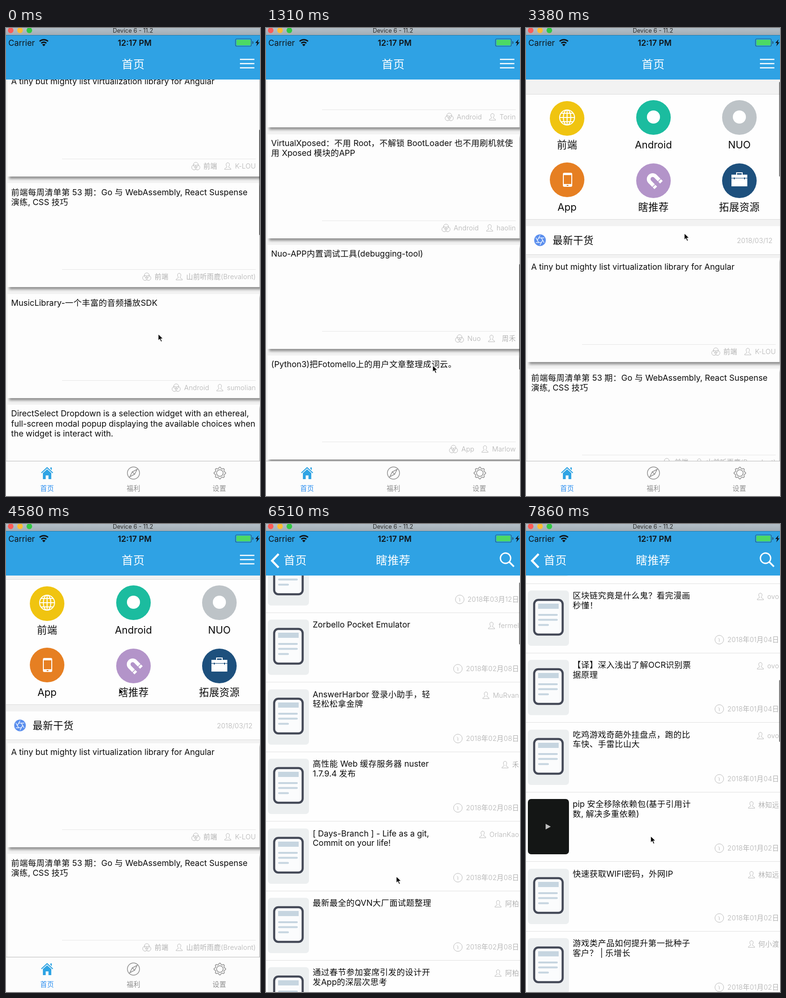
An HTML page for the animation above (8 s loop, 544 by 999 pixels).

```html
<!DOCTYPE html>
<html lang="zh-CN">
<head>
<meta charset="utf-8">
<title>首页</title>
<style>
html, body { margin: 0; width: 100%; height: 100%; overflow: hidden; background: #fff; }
#stage { position: relative; width: 544px; height: 999px; overflow: hidden; background: #f2f2f2;
  font: 17.6px Inter, "Noto Sans CJK SC", "Noto Sans CJK", sans-serif; color: #0c0c0c; white-space: nowrap; }
#stage div, #stage svg { position: absolute; }
i { font-style: normal; letter-spacing: .022em; }
svg { overflow: visible; }
.fill { inset: 0; }

#window { left: 0; top: 0; width: 544px; height: 15px; background: linear-gradient(#b3bfc8, #a3adb5);
  box-shadow: 0 1px rgba(0,0,0,.25); font-size: 12.6px; line-height: 12px; text-align: center; color: #2b2b2b; }
#top { left: 0; top: 15px; width: 544px; height: 95px; background: #2fa2e4; }
.bar { left: 0; top: 0; width: 544px; height: 95px; color: #fff; font-size: 24.2px; line-height: 30px; }
.bar .title { left: 0; width: 545px; top: 48px; text-align: center; font-weight: 500; }
.status { top: 6px; line-height: 21px; font-size: 17.4px; color: #101418; }

.view { left: 0; top: 110px; width: 544px; overflow: hidden; }
#home { left: 0; top: 0; width: 544px; height: 999px; background: #f2f2f2; }
#feed { height: 814px; }
#list { height: 889px; background: #fefefe; }
.body { left: 0; top: 0; width: 544px; }
.thumb { left: 542px; width: 3px; border-radius: 1.5px; background: rgba(0,0,0,.5); }

.panel { left: 0; width: 544px; background: #fefefe; box-shadow: 0 0 0 1px #dcdcdc; }
.disc { width: 74px; height: 74px; border-radius: 50%; }
.disc svg { left: 0; top: 0; }
.label { width: 180px; text-align: center; font-size: 21.4px; line-height: 28px; }

.card { left: 3px; width: 540px; height: 222px; background: #fdfdfd; box-shadow: 4px 5px 5px rgba(0,0,0,.4); }
.card .text { left: 8px; top: 8.3px; line-height: 21.4px; }
.card .rule { left: 117px; top: 184px; width: 415px; height: 1px; background: #e6e6e6; }
.meta { display: flex; align-items: center; height: 20px; font-size: 14.5px; line-height: 20px;
  letter-spacing: .15px; font-weight: 300; color: #b2b2b2; }
#stage .meta svg { position: static; margin-right: 7px; flex: none; }
.meta span + svg { margin-left: 15px; }
.card .meta { right: 8px; top: 190px; }

.row { left: 0; width: 544px; height: 148px; border-bottom: 1px solid #e0e0e0; }
.row .pic { left: 3.5px; top: 15px; width: 88.5px; height: 118px; border-radius: 7px; background: #eceff0; overflow: hidden; }
.row .text { left: 100px; top: 16px; line-height: 20.6px; }
.row .meta { right: 2px; }

#tabs { left: 0; top: 924px; width: 544px; height: 75px; background: #fcfcfc; border-top: 1px solid #b8b8b8; box-sizing: border-box; }
.tab { top: 49px; width: 100px; text-align: center; font-size: 14.5px; line-height: 18px; color: #8e8e8e; }
</style>
</head>
<body>
<svg width="0" height="0" style="position:absolute">
  <symbol id="cat" viewBox="0 0 19 18" overflow="visible"><g fill="none" stroke="#b8b8b8">
    <circle cx="9.5" cy="6" r="5.3"/><circle cx="6" cy="11.6" r="5.3"/><circle cx="13" cy="11.6" r="5.3"/></g></symbol>
  <symbol id="user" viewBox="0 0 16 16" overflow="visible"><path fill="none" stroke="#b8b8b8"
    d="M8 .6c-2.5 0-3.6 1.8-3.6 4 0 2 .9 3 1.6 4v1.7c-1 .9-4.4 1.2-4.9 4.5h13.8c-.5-3.3-3.9-3.6-4.9-4.5V8.6c.7-1 1.6-2 1.6-4 0-2.2-1.1-4-3.6-4z"/></symbol>
  <symbol id="clock" viewBox="0 0 20 20" overflow="visible"><g fill="none" stroke="#b8b8b8">
    <circle cx="10" cy="10" r="9.3"/><path d="M8 6.5l2 2v6"/></g></symbol>
</svg>

<div id="stage">
  <div id="home">
    <div id="feed" class="view"><div class="body"></div><div class="thumb"></div></div>
    <div id="tabs">
      <svg width="544" height="50" fill="none" stroke="#8e8e8e" stroke-width="1.5">
        <path fill="#2fa4e4" stroke="none" d="M88 12l13 12-1.5 1.6L88 15 76.500 25.600 75 24zM95 13h3v6l-3-3zM79 25l9-8 9 8v13h-6v-8h-6v8h-6z"/>
        <circle cx="273" cy="25" r="13"/>
        <path d="M281 17l-5.500 10.500-5-5zM265 33l5.500-10.500 5 5z"/>
        <circle cx="458" cy="25" r="7"/><path id="gear" stroke-linejoin="round"/>
      </svg>
      <div class="tab" style="left:38px;color:#2b8ef0"><i>首页</i></div>
      <div class="tab" style="left:223px"><i>福利</i></div>
      <div class="tab" style="left:407px"><i>设置</i></div>
    </div>
  </div>

  <div id="list" class="view"><div class="body"></div><div class="thumb"></div></div>

  <div id="top">
    <div class="bar" id="homeBar">
      <div class="title"><i>首页</i></div>
      <svg width="544" height="95" stroke="#fff" stroke-width="2.4"><path d="M501 52h31M501 61h31M501 70h31"/></svg>
    </div>
    <div class="bar" id="listBar">
      <div class="title"><i>瞎推荐</i></div>
      <div style="left:38px;top:48px"><i>首页</i></div>
      <svg width="544" height="95" fill="none" stroke="#fff">
        <path stroke-width="4.5" d="M27 49L13 63.5 27 78"/>
        <circle cx="513" cy="58" r="11" stroke-width="2.8"/><path stroke-width="3.6" d="M521 66l10 10"/>
      </svg>
    </div>
    <div class="status" style="left:5px">Carrier</div>
    <div class="status" style="left:0;width:551px;text-align:center;font-weight:600">12:17 PM</div>
    <svg width="544" height="30" fill="none" stroke="#101418">
      <path stroke-width="3" d="M72 13.5a13 13 0 0 1 18 0M75.5 17.5a8 8 0 0 1 11 0"/>
      <path fill="#101418" stroke="none" d="M77.5 20.5a5 5 0 0 1 7 0L81 24z"/>
      <rect x="491.5" y="8" width="34" height="16" rx="3" stroke="#27607f" stroke-width="1.2"/>
      <rect x="493.5" y="10" width="30" height="12" rx="1.5" fill="#4cd964" stroke="none"/>
      <path fill="#27607f" stroke="none" d="M527.5 13q2.5 0 2.5 3t-2.5 3z"/>
      <path fill="#101418" stroke="none" d="M541 9l-7 8h4l-2 7 7-8.5h-4z"/>
    </svg>
  </div>
  <div id="window">
    <svg style="left:0;top:0" width="60" height="15"><circle cx="10" cy="5" r="6" fill="#fc5b57"/>
      <circle cx="30" cy="5" r="6" fill="#fdbc30"/><circle cx="50" cy="5" r="6" fill="#30c842"/></svg>
    <div class="fill">Device 6 - 11.2</div>
  </div>
  <svg id="cursor" style="left:0;top:0" width="13" height="19"><path stroke="#fff" stroke-width="1.2"
    d="M0 0v14.5l3.4-3.2 2.4 5.7 2.6-1.1-2.4-5.5h4.7z"/></svg>
</div>

<script>
const $ = s => document.querySelector(s);
const text = s => s.replace(/[\u3000-\uffef]+/g, '<i>$&</i>').replace(/\n/g, '<br>');
const icon = (id, w, h) => `<svg width="${w}" height="${h}"><use href="#${id}"/></svg>`;
const user = name => icon('user', 16, 16) + `<span>${text(name)}</span>`;

// Outline of the settings gear
const teeth = [];
for (let k = 0; k < 32; k++) {
  const a = (k - .5) * Math.PI / 16, r = k % 4 < 2 ? 12.5 : 10;
  teeth.push([458 + r * Math.sin(a), 25 - r * Math.cos(a)]);
}
$('#gear').setAttribute('d', 'M' + teeth.join('L') + 'z');

const groups = [
  ['前端', 88, 193, '#f0c410', '<g fill="none" stroke="#fff" stroke-width="2"><circle cx="37" cy="35" r="16"/><ellipse cx="37" cy="35" rx="8" ry="16"/><path d="M37 19v32M21 35h32M24 26h26M24 44h26"/></g>'],
  ['Android', 273, 191, '#1bbc9f', '<circle cx="37" cy="36" r="14"/>'],
  ['NUO', 457, 191, '#bdc3c7', '<circle cx="37" cy="36" r="14"/>'],
  ['App', 88, 324, '#e67f22', '<path fill-rule="evenodd" d="M31 22h14q3 0 3 3v24q0 3-3 3H31q-3 0-3-3V25q0-3 3-3zM30 27v19h16V27zM36 48v2h4v-2z"/>'],
  ['瞎推荐', 273, 326, '#b394c9', '<g transform="rotate(-45 37 36)"><path fill="none" stroke="#fff" stroke-width="8" d="M29 51V33a8.5 8.5 0 0 1 17 0v18"/><path stroke="#b394c9" stroke-width="1.5" d="M24 45h10M41 45h10"/></g>'],
  ['拓展资源', 457, 326, '#1d507d', '<path d="M20 24h34v7H20zM20 32h34v17H20z"/><path fill="none" stroke="#fff" stroke-width="2" d="M31 24v-4h12v4"/><path stroke="#1d507d" stroke-width="2" d="M26 30v4M48 30v4"/>']
];

const cards = [
  ['A tiny but mighty list virtualization library for Angular', '前端', 'K-LOU'],
  ['前端每周清单第 53 期：Go 与 WebAssembly, React Suspense\n演练, CSS 技巧', '前端', '山前听雨鹿(Brevalont)'],
  ['MusicLibrary-一个丰富的音频播放SDK', 'Android', 'sumolian'],
  ['DirectSelect Dropdown is a selection widget with an ethereal,\nfull-screen modal popup displaying the available choices when\nthe widget is interact with.', 'Android', 'Kelvor'],
  ['Android 轻量级下拉刷新控件', 'Android', 'Torin'],
  ['VirtualXposed：不用 Root，不解锁 BootLoader 也不用刷机就使\n用 Xposed 模块的APP', 'Android', 'haolin'],
  ['Nuo-APP内置调试工具(debugging-tool)', 'Nuo', '\u2002周禾'],
  ['(Python3)把Fotomello上的用户文章整理成词云。', 'App', 'Marlow'],
  ['高性能 Web 缓存服务器 nuster 1.7.9.6 发布', '瞎推荐', 'null'],
  ['一个帮你轻松完成Api接口调试的IDEA插件', '拓展资源', '云端里的琴声'],
  ['Blockchain 区块链-学习资源汇总', '拓展资源', 'shuyezhi']
];

const rows = [
  ['高性能 Web 缓存服务器 nuster\n1.7.9.6 发布', '禾', '03月12'],
  ['Zorbello Pocket Emulator', 'fermel', '02月08'],
  ['AnswerHarbor 登录小助手，轻\n轻松松拿金牌', 'MuRvan', '02月08'],
  ['高性能 Web 缓存服务器 nuster\n1.7.9.4 发布', '禾', '02月08'],
  ['[ Days-Branch ] - Life as a git,\nCommit on your life!', 'OrlanKao', '02月08'],
  ['最新最全的QVN大厂面试题整理', '阿柏', '02月08'],
  ['通过春节参加宴席引发的设计开\n发App的深层次思考', '阿柏', '02月08'],
  ['100行python能做什么？能在朋\n友圈登顶。', 'Stephen Lorn', '01月16', 'shot'],
  ['轻松励志有节操的程序猿故事。', 'Meilo Tan', '01月10'],
  ['If You Had Bought Crypto', 'Ozzmind', '01月10'],
  ['区块链究竟是什么鬼？看完漫画\n秒懂！', 'ovo', '01月04'],
  ['【译】深入浅出了解OCR识别票\n据原理', 'ovo', '01月04'],
  ['吃鸡游戏奇葩外挂盘点，跑的比\n车快、手雷比山大', 'ovo', '01月04'],
  ['pip 安全移除依赖包(基于引用计\n数, 解决多重依赖)', '林知远', '01月02', 'video'],
  ['快速获取WIFI密码，外网IP', '林知远', '01月02'],
  ['游戏类产品如何提升第一批种子\n客户？ | 乐增长', '何小渡', '01月02']
];

const pics = {
  doc: '<rect x="13.5" y="20" width="61" height="74" rx="9" fill="#fbfcfd" stroke="#444957" stroke-width="4.5"/><path fill="#c6d5e0" d="M22 28h44v11H22z"/><path stroke="#c6d5e0" stroke-width="4.2" stroke-linecap="round" d="M24 52h38M24 62.5h38M24 73.5h19"/>',
  shot: '<path fill="#fafafa" d="M0 0h89v118H0z"/><path fill="#1c1e1d" d="M0 0h10v13H0zM13 0h60v18H13zM76 0h13v13H76zM0 107h10v11H0zM13 107h60v11H13zM76 107h13v11H76z"/><path fill="#a9c25c" d="M0 30h10v7H0zM17 6h5v5h-5z"/><path fill="#666" d="M14 98h58v8H14z"/><path stroke="#aaa" stroke-width="1.5" stroke-dasharray="14 32" d="M15 20h58M15 33h58M15 46h58M15 59h58M15 72h58M15 85h58"/>',
  video: '<path fill="#141615" d="M0 0h89v118H0z"/><path fill="#bdbdbd" d="M38 53l11 6-11 6z"/>'
};

const grid = groups.map(([name, x, y, color, art], k) =>
  `<div class="disc" style="left:${x - 37}px;top:${y - 170}px;background:${color}"><svg width="74" height="74" fill="#fff">${art}</svg></div>
   <div class="label" style="left:${x - 90}px;top:${k < 3 ? 102 : 235}px">${text(name)}</div>`).join('');

const blades = [0, 60, 120, 180, 240, 300].map(a => `<path transform="rotate(${a})" d="M-3 -5L9 -5"/>`).join('');

$('#feed .body').innerHTML =
  `<div class="panel" style="top:9px;height:266px"></div>${grid}
   <div class="panel" style="top:290px;height:60px;box-shadow:0 1px #dcdcdc">
     <svg style="left:30px;top:30px" width="1" height="1" stroke="#fff" stroke-width="1.3"><circle r="12.5" fill="#5b8fee" stroke="none"/>${blades}</svg>
     <div style="left:57px;top:16px;font-size:21.5px;line-height:28px"><i>最新干货</i></div>
     <div class="meta" style="right:16px;top:21px">2018/03/12</div>
   </div>` +
  cards.map(([title, kind, name], k) =>
    `<div class="card" style="top:${358 + 236.3 * k}px"><div class="text">${text(title)}</div><div class="rule"></div>
     <div class="meta">${icon('cat', 19, 18)}<span>${text(kind)}</span>${user(name)}</div></div>`).join('');

$('#list .body').innerHTML = rows.map(([title, name, day, pic = 'doc'], k) =>
  `<div class="row" style="top:${1 + 148.4 * k}px"><div class="pic"><svg width="88" height="118">${pics[pic]}</svg></div>
   <div class="text">${text(title)}</div><div class="meta" style="top:18px">${user(name)}</div>
   <div class="meta" style="top:110px">${icon('clock', 20, 20)}<span>${text(`2018年${day}日`)}</span></div></div>`).join('');

// Keys are [step, value...], joined by straight lines
function along(keys, n) {
  let k = 1;
  while (k < keys.length - 1 && keys[k][0] < n) k++;
  const a = keys[k - 1], b = keys[k];
  const p = Math.min(1, Math.max(0, (n - a[0]) / (b[0] - a[0])));
  return a.slice(1).map((v, j) => v + (b[j + 1] - v) * p);
}

const feedKeys = [[0, 373], [1, 410], [4, 850], [9, 1423], [11, 1660], [13, 2080], [15, 2172], [16, 2160],
  [17, 2110], [18, 1960], [20, 1150], [22, 110], [23, -23], [24, -28], [25, -12], [27, 0]];
const listKeys = [[42, 0], [44, 70], [48, 568], [50, 860], [52, 1390], [53, 1468]];
const pushKeys = [[34, 0], [35, .3], [36, .78], [37, .97], [38, 1]];
const cursorKeys = [[0, 326, 653], [3, 338, 540], [7, 357, 730], [9, 357, 720], [11, 366, 500], [13, 376, 580],
  [15, 379, 503], [17, 365, 380], [20, 350, 500], [23, 339, 438], [27, 300, 400], [31, 242, 350], [32, 292, 350],
  [35, 292, 350], [38, 293, 377], [42, 282, 770], [48, 273, 716], [53, 267, 666]];

function scroll(id, y, max, track, size, shown) {
  const over = Math.max(0, -y, y - max);
  const rest = Math.min(1, Math.max(0, y / max));
  const len = size - over;
  $(id + ' .body').style.transform = `translateY(${-y}px)`;
  const bar = $(id + ' .thumb').style;
  bar.height = len + 'px';
  bar.top = 5 + rest * (track - len) + 'px';
  bar.opacity = shown;
}

const DURATION = 8000, STEPS = 54;
function render(t) {
  const n = Math.min(STEPS - 1, Math.floor(t * STEPS / DURATION + .2));
  const [push] = along(pushKeys, n);
  const [x, y] = along(cursorKeys, n);
  const [listY] = along(listKeys, n);
  scroll('#feed', along(feedKeys, n)[0], 2130, 808, 225, along([[28, 1], [30, 0]], n)[0]);
  scroll('#list', listY, 5037, 881, 132, listY > 0 ? 1 : 0);
  $('#home').style.transform = `translateX(${-163 * push}px)`;
  $('#list').style.transform = `translateX(${544 * (1 - push)}px)`;
  $('#homeBar').style.opacity = 1 - push;
  $('#listBar').style.opacity = push;
  $('#cursor').style.transform = `translate(${x}px, ${y}px)`;
}

const start = performance.now();
function tick() {
  render((performance.now() - start) % DURATION);
  requestAnimationFrame(tick);
}
tick();
</script>
</body>
</html>
```
